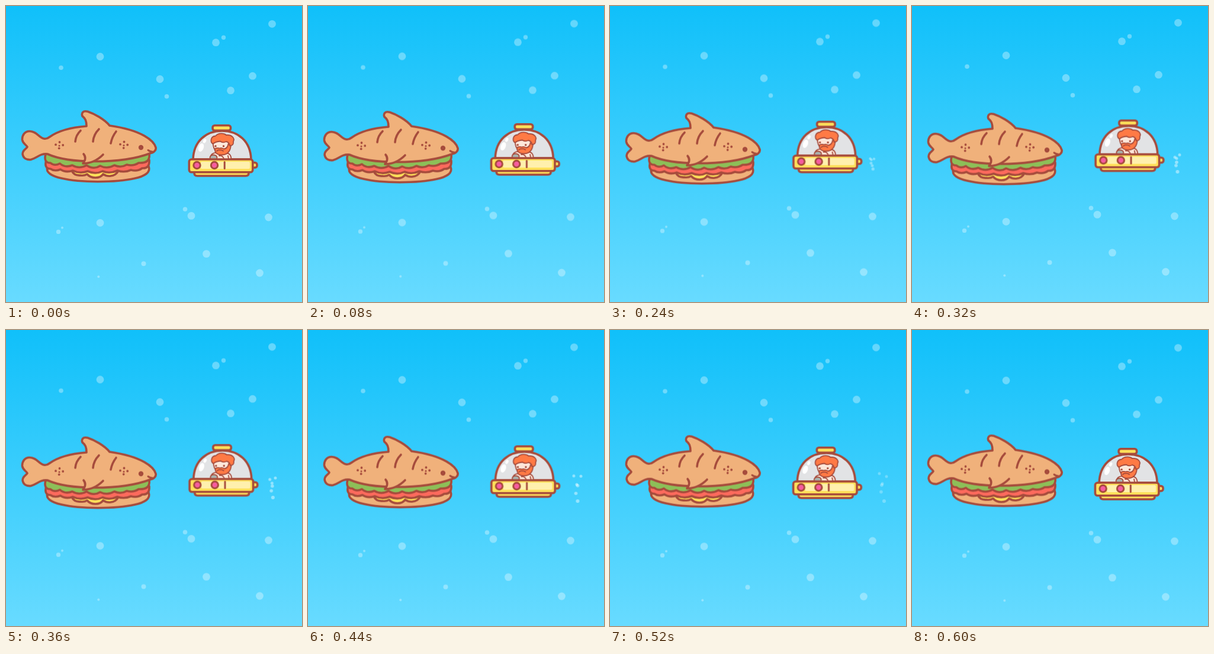
An HTML page without scripts that plays this animation: 500 by 500 pixels, repeating every 640 ms.

```html
<!DOCTYPE html>
<html lang="en">
<head>
<meta charset="utf-8">
<title>Sandwich chase</title>
<style>
  html, body { margin: 0; width: 100%; height: 100%; overflow: hidden; background: #3acdfd; }
  svg { display: block; width: 100vw; height: 100vh; }

  .line { stroke: #a64b3c; stroke-width: 3.6; stroke-linecap: round; stroke-linejoin: round; }
  .thin { stroke-width: 1.8; }
  .mid { stroke-width: 3; }
  .flat { stroke: none; }
  .open { fill: none; }
  .dark { fill: #a64b3c; }
  .bun { fill: #f0b17b; }
  .green { fill: #8dbf58; }
  .red { fill: #fc6a5d; }
  .yellow { fill: #ffe05a; }
  .pale { fill: #fff0ad; }
  .hair { fill: #ff7a45; }
  .skin { fill: #fee7da; }
  .pink { fill: #f65c9f; }
  .glass { fill: #e2e3e5; }
  .wheel { fill: #a9b3ae; }
  .white { fill: #fff; }

  /* one 40 ms step per pose, there and back */
  .bob { animation: bob 640ms steps(8) infinite; }
  @keyframes bob {
    0%, 100% { transform: none; }
    50% { transform: translate(var(--dx, 0px), var(--dy)); }
  }
  .fish { --dy: 4.3px; }
  .sub { --dx: .8px; --dy: -8.4px; }
  .sea { --dy: -2px; fill: #fff; fill-opacity: .34; }

  .wake circle { fill: #fff; opacity: 0; animation: drift 640ms infinite; }
  @keyframes drift {
    0%, 12.5% { opacity: 0; transform: translate(428px, 264px) scale(.4); animation-timing-function: steps(2); }
    25% { opacity: .28; transform: translate(var(--a)) scale(.75); animation-timing-function: steps(4); }
    50% { opacity: .45; transform: translate(var(--b)) scale(1); animation-timing-function: steps(3); }
    68.75% { opacity: .45; transform: translate(var(--c)) scale(1); animation-timing-function: steps(2); }
    81.25% { opacity: .28; transform: translate(var(--d)) scale(1); animation-timing-function: steps(2); }
    93.75%, 100% { opacity: 0; transform: translate(var(--d)) translate(5px, -1px); }
  }
</style>
</head>
<body>
<svg viewBox="0 0 500 500">
  <defs>
    <linearGradient id="water" x2="0" y2="1">
      <stop stop-color="#10c0fa"/>
      <stop offset="1" stop-color="#68dbff"/>
    </linearGradient>
    <g id="pores" class="dark flat">
      <circle cx=".5" cy="-5" r="1.9"/>
      <circle cx="-6" cy="-.8" r="1.9"/>
      <circle cx="6.2" cy="0" r="1.9"/>
      <circle cx="-.3" cy="5.3" r="1.9"/>
      <circle cx="0" cy="1" r="1.5"/>
    </g>
  </defs>
  <rect width="500" height="500" fill="url(#water)"/>

  <g class="bob sea">
    <circle cx="449.5" cy="30.3" r="6.4"/>
    <circle cx="354.5" cy="61.7" r="6.4"/>
    <circle cx="367.5" cy="53.2" r="3.7"/>
    <circle cx="159" cy="85.5" r="6.4"/>
    <circle cx="93" cy="104.2" r="3.8"/>
    <circle cx="260" cy="123.5" r="6.4"/>
    <circle cx="271.5" cy="152.7" r="3.8"/>
    <circle cx="416.5" cy="118.2" r="6.4"/>
    <circle cx="379.5" cy="142.7" r="6.4"/>
    <circle cx="302.5" cy="343.2" r="3.8"/>
    <circle cx="313" cy="354.4" r="6.4"/>
    <circle cx="443.5" cy="357" r="6.4"/>
    <circle cx="338.5" cy="418.6" r="6.4"/>
    <circle cx="428.5" cy="451" r="6.4"/>
    <circle cx="159" cy="366.3" r="6.4"/>
    <circle cx="88.5" cy="381.4" r="3.7"/>
    <circle cx="95" cy="374.4" r="2"/>
    <circle cx="232.5" cy="435.3" r="4"/>
    <circle cx="156.3" cy="457.2" r="2"/>
  </g>

  <g class="bob fish line">
    <path class="bun" d="M70 272C63 290 112 296.700 155 296.700S249 291 241 271Z"/>
    <path class="yellow" d="M111 278Q115 287 126 286Q132 287 137 284Q142 290 151 290Q160 290 164 284Q170 288 177 287Q186 286 190 278Z"/>
    <path class="red" d="M68 260C65 270 68 275 75 275Q82 280 92 276Q101 282 113 278Q125 284 138 279Q151 285 163 279Q175 284 188 278Q200 282 211 277Q222 280 230 274Q243 275 242 260Z"/>
    <path class="green" d="M67 250C64 261 68 265 75 265Q82 271 91 266Q100 274 112 269Q124 276 136 269Q148 277 159 270Q171 276 183 269Q194 274 204 268Q215 271 224 265Q244 266 242 250Z"/>
    <path class="bun" d="M64 224C56 223 52 211.500 40 211.500C31 211.500 27 219 27.500 226C28.500 233 34 234 36 238C34 242 28 243 28 250C29 258 36 260 42 259.500C53 257 56 249 70 250C90 259 120 262.500 150 262.500C192 262.500 222 257 243 249C250 248 254 243 253 239C250 228 231 210 175 202C166 191 149 182 138 178.300C130 176 127 181 129 186C134 190 136 194 136 203C110 205 88 211 74 221Q69 225 64 224Z"/>
    <path class="bun flat" d="M131 250Q137 257 130 266Q149 266 164 251Z"/>
    <path class="open" d="M131 250Q137 257 130 266Q149 266 164 251"/>
    <path class="open" d="M126 210.500Q118 218 117 229M157 208Q148 217 147 229M186 212Q179 221 177 232"/>
    <path class="open mid" d="M240 243.500Q244 246.500 249 246.500"/>
    <circle class="dark flat" cx="228" cy="239" r="4.2"/>
    <use href="#pores" x="90" y="235"/>
    <use href="#pores" x="199" y="234.500"/>
  </g>

  <g class="bob sub line">
    <path class="yellow" d="M318 278H410V282Q410 287 405 287H323Q318 287 318 282Z"/>
    <rect class="yellow" x="413" y="264.500" width="11" height="8.500" rx="3.500"/>
    <path class="glass" d="M316 259C317 228 338 211 365 211S413 228 414 259Z"/>
    <rect class="yellow" x="349" y="201.700" width="30.500" height="8.600" rx="3.500"/>
    <g class="white flat">
      <ellipse rx="4.3" ry="7.3" transform="translate(329.500 239) rotate(20)"/>
      <ellipse rx="2.4" ry="3.8" transform="translate(335.500 228) rotate(28)"/>
    </g>

    <g class="thin">
      <path class="skin" d="M347 260C343 251 350 247 357 248H371C379 249 381 254 380 260Z"/>
      <path class="open" d="M368 258Q366 252 360 253M375 253L376 258"/>
      <path class="skin" d="M349.500 227Q349 247 362 248Q380 248 380 227Z"/>
      <path class="hair" d="M353 241Q352 251.500 365 251.500Q379 251 380 234L375.500 233Q374 241 368 241.500Q364 239 361 240.500Q357 239 353 241Z"/>
      <path class="hair" d="M349.500 233C344 229 346 220 354 219.500C359 214 368 214.500 372 218C381 217 387 223 384 229Q385 236 378 236Q377 230 372 229Q366 232 362 228.500Q354 229 349.500 233Z"/>
      <path class="open" d="M356 245Q359 242.500 361 243.500Q364 242.500 367 245"/>
      <ellipse class="wheel" cx="350.500" cy="256" rx="6" ry="4.500"/>
      <g class="dark flat">
        <circle cx="354" cy="236.700" r="1.7"/>
        <circle cx="367.500" cy="236.700" r="1.7"/>
      </g>
    </g>

    <rect class="yellow" x="309.300" y="259" width="107.500" height="21.800" rx="4"/>
    <rect class="pale flat" x="329" y="263" width="83" height="12" rx="2"/>
    <g class="pink mid">
      <circle cx="322.500" cy="269" r="5.700"/>
      <circle cx="352" cy="269" r="5.700"/>
      <path d="M369.200 263.500V274.500"/>
    </g>
  </g>

  <g class="wake">
    <circle r="2.500" style="--a:435px,260px;--b:444px,255.500px;--c:449px,246.500px;--d:455px,242.500px"/>
    <circle r="2.500" style="--a:440px,265px;--b:452px,251.500px;--c:461px,247px;--d:467px,247.500px"/>
    <circle r="2.500" style="--a:436px,262px;--b:447px,257.500px;--c:454px,261px;--d:460px,259.500px"/>
    <circle r="2.800" style="--a:435px,267px;--b:447px,264px;--c:455.500px,263px;--d:459px,262px"/>
    <circle r="2.800" style="--a:440px,270px;--b:446px,269.500px;--c:452.500px,276px;--d:458px,273.500px"/>
    <circle r="3" style="--a:440px,270.500px;--b:448.500px,280px;--c:455.500px,289px;--d:463px,289px"/>
  </g>
</svg>
</body>
</html>
```
